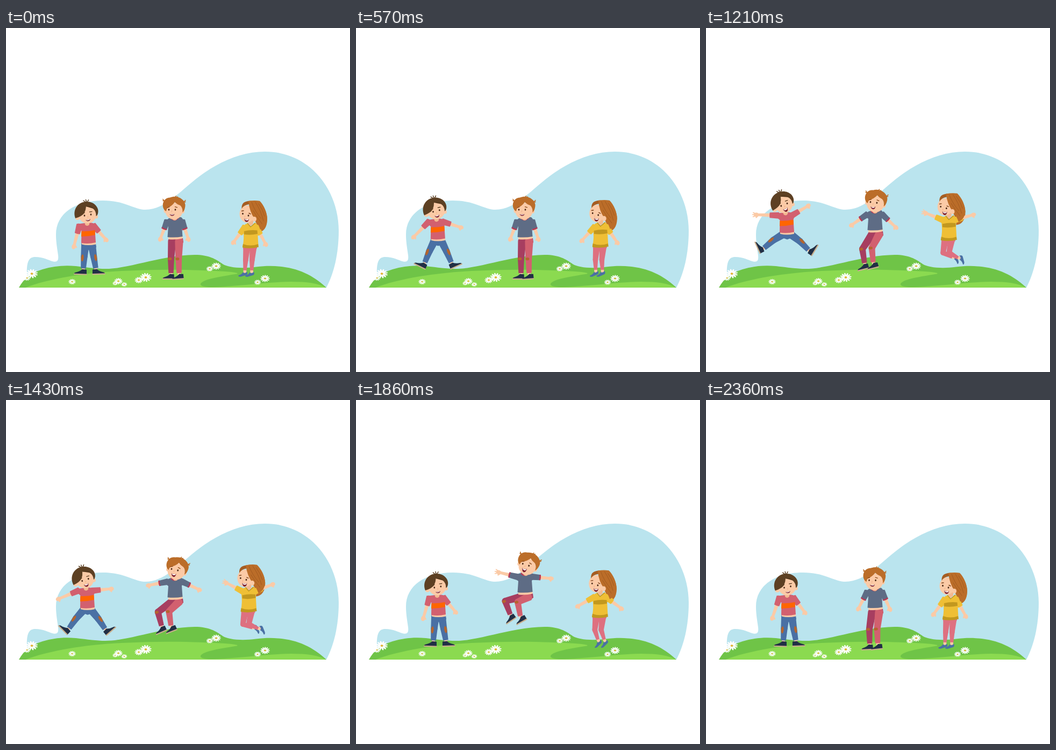
An HTML page for the animation above (2430 ms loop, 640 px wide and 640 px high).

```html
<!DOCTYPE html>
<html lang="en">
<head>
<meta charset="utf-8">
<title>Jumping kids</title>
<style>
  html, body { margin: 0; width: 100%; height: 100%; overflow: hidden; background: #fff; }
  svg { display: block; width: 100%; height: 100%; }
</style>
</head>
<body>
<svg id="stage" viewBox="0 0 640 640">
  <path fill="#bae4ee" d="M39 460C38 436 42 426 54 426C70 426 78 432 88 434.5C96 436 98 432 97 423C95 408 93 398 93 384C93 346 128 321 180 321C222 321 238 338 259 338C299 338 325 300 368 270C403 246 441 230 482 230C565 230 619 301 619 377C619 420 610 457 596 483H60Z"/>
  <path fill="#6fc447" d="M24 483C33 466 48 455 68 449C88 443 108 441 130 443C165 447 185 451 215 445C256 438 303 422.500 351 422C378 422 390 430 403 439C413 446 440 448 465 444.500C520 438 562 451 596 483Z"/>
  <path fill="#8bda50" d="M36 483C80 466 150 455 215 452C290 448 370 450 420 454C433 456 433 457 426 458C390 464 366 468 362 476C361 480 368 482 385 482C430 481 480 473 530 472C560 472 582 475 595 483Z"/>
  <g id="flowers"></g>
  <g id="kids"></g>
</svg>
<script>
const LOOP = 2430, STEPS = 34;
const SKIN = '#fbcaa6', SHADE = '#f3b991', NAVY = '#212f45', SOLE = '#c9ae8c', JEANS = '#4a70a4';
const RED = '#d2606f', MAROON = '#a73e60', GREY = '#5e6c85', YELLOW = '#efbf35', OCHRE = '#c2981f';
const PINK = '#de7080', GINGER = '#bb6d29', BROWN = '#5d4023', PATCH = '#b5652d';

const path = (d, fill) => `<path d="${d}" fill="${fill}"/>`;
const line = (d, color, w) =>
  `<path d="${d}" fill="none" stroke="${color}" stroke-width="${w}" stroke-linecap="round"/>`;
const oval = (x, y, rx, ry, fill) => `<ellipse cx="${x}" cy="${y}" rx="${rx}" ry="${ry}" fill="${fill}"/>`;
const joint = (name, inner) => `<g data-j="${name}">${inner}</g>`;

function daisy(x, y, r) {
  let petals = '';
  for (let a = 0; a < 360; a += 30) {
    petals += `<ellipse cx="${r * .6}" rx="${r * .4}" ry="${r * .14}" fill="#fff" transform="rotate(${a + x % 30})"/>`;
  }
  return `<g transform="translate(${x} ${y}) scale(1 .76)">${petals}${oval(0, 0, r * .2, r * .2, '#f0b32e')}</g>`;
}

// Each patch is one big daisy with smaller ones beside it
const meadow = [
  daisy(39, 465, 7), daisy(48, 457, 11.5), daisy(123, 472, 7),
  daisy(203, 475, 5), daisy(209, 471, 8), daisy(220, 477, 5.5),
  daisy(247, 469, 8), daisy(260, 464, 11), daisy(379, 448, 6.5),
  daisy(391, 443, 9), daisy(468, 473, 6.5), daisy(482, 466, 9)
];
document.getElementById('flowers').innerHTML = meadow.join('');

// Limb pieces hang downwards from their joint
const taper = (len, a, b, fill, round) =>
  path(`M${-a} 0L${-b} ${len}${round ? `A${b} ${b} 0 0 0 ${b} ${len}` : `H${b}`}L${a} 0A${a} ${a} 0 0 0 ${-a} 0Z`, fill);

function arm(side, k) {
  const [, , len] = k.arms[side], dir = side ? -1 : 1;
  const fingers = line('M-2 1L-4 6M0 2V7M2 1L4 6', SKIN, 1.8);
  return joint('arm' + side,
    taper(len - 4, 3.8, 2.5, SKIN) + oval(0, len - 1, 3.9, 5, SKIN) +
    line(`M${dir * 2} ${len - 4}L${dir * 5} ${len - 1}`, SKIN, 2.4) +
    `<g transform="translate(0 ${len - 1})">${joint('fingers' + side, fingers)}</g>` +
    path('M-6 -2Q0 -6 6 -2L5 15Q0 16 -5 15Z', k.sleeve) +
    (k.trim ? path('M-5.2 13Q0 14 5.2 13L5 15.6Q0 16.6 -5 15.6Z', k.trim) : ''));
}

function leg(side, k) {
  const [hip, knee, ankle] = k.legWidth, color = k.pants[side];
  const foot = joint('foot' + side, path('M-2.8 -1H2.8V5H-2.8Z', SKIN) + k.shoe(side));
  return joint('thigh' + side, joint('upper' + side, taper(k.thigh, hip, knee, color, true)) +
    joint('shin' + side, foot + taper(k.shin, knee, ankle, color) + k.patch(side)));
}

const sneaker = (dx, sx) => `<g transform="translate(${dx} 0) scale(${sx} 1)">` +
  path('M6 2.5L-2 1.5Q-7 6 -15 7.5Q-18 9 -17 10.5L6 11Z', NAVY) + line('M-17 10.4L5.5 11.2', SOLE, 2.2) + '</g>';

const mouth = (x, y, tilt) => `<g transform="translate(${x} ${y}) rotate(${tilt})">` + joint('mouth',
  path('M-4.5 -1.5Q0 .5 4.5 -2Q4 5 .3 5Q-3 5 -4.5 -1.5Z', '#7d2230') +
  path('M-4 -1.2Q0 .5 4 -1.6Q3.6 1.6 0 1.6Q-3 1.4 -4 -1.2Z', '#fff')) + '</g>';

const eye = (x, y) => oval(x, y, 1.4, 1.7, '#4a2a18');
const nose = (x, y) => line(`M${x} ${y}l-.4 2`, '#e8a77f', .9);

// Every kid moves between a resting and a jumping pose.
// Angles in degrees; legs are [thigh, shin, foot], left then right.
const kids = [
  {
    rise: [130, 1210], fall: [1210, 1830], sway: 12,
    rest: { x: 0, y: 0, head: 0, arms: [15, -42], legs: [[5, 4, 0], [-9, -10, 0]], short: 1, smile: .25 },
    jump: { x: -3, y: -19.5, head: -13, arms: [92, -121], legs: [[59, 50, 64], [-53, -45, -57]], short: 1, smile: 1 },
    arms: [[136.5, 368, 41], [163, 368, 36]], sleeve: RED,
    hips: [[147.5, 402.5], [159.5, 402.5]], thigh: 22.5, shin: 22.5,
    pants: [JEANS, JEANS], legWidth: [7.4, 6.2, 4.8],
    patch: side => oval(side ? 3.2 : -3.2, 3, 2.5, 6.5, PATCH),
    shoe: side => sneaker(0, side ? -1 : 1),
    neck: [150.5, 364], back: '',
    pelvis: path('M141 401H167L168 408L154 413L140 408Z', JEANS),
    torso: path('M141 398H167V402.5Q153 405.5 141 402.5Z', SKIN) +
      path('M138 364L146 363Q151 368 156 362L162 363Q166 366 167 372L165.5 376L167 399Q153 402.5 140 400L140.5 377L135 372Q135 366 138 364Z', RED) +
      path('M140.5 378Q152 379 165.5 376L166 385Q153 388 140 388Z', '#ff6500'),
    head: path('M147 358H155V366Q151 370 147 366Z', SHADE) +
      oval(133, 353.5, 4, 3.8, SKIN) + oval(168, 351, 3.2, 3.6, SKIN) + oval(151.5, 347, 16.5, 16.5, SKIN) +
      path('M129 354C123 337 135 323 150 323C165 323 174 335 171 345Q170 349 167.5 350Q168 341 162 336Q155 334 149 332Q148 346 139 350L135 352Z', BROWN) +
      line('M149 325L144 321M150 325L148.5 319.5M150.5 325L153.5 319.8', BROWN, 1.5) +
      line('M150 332Q158 331 163 336', '#4a3019', .8) +
      eye(146, 349) + eye(158, 347) + line('M155.5 342.2L160 341.6M143.5 345L146 343.6', BROWN, 1.4) +
      nose(152.5, 350.5) + mouth(152.5, 357, -9)
  },
  {
    rise: [800, 1800], fall: [1800, LOOP], sway: 0,
    rest: { x: 0, y: 0, head: 0, arms: [21, -19], legs: [[3.5, 0, -2], [1.5, -2, -6]], short: 1, smile: .3 },
    jump: { x: 0, y: -33, head: 19, arms: [109, -89], legs: [[80, -22, -38], [69, -11, -33]], short: .7, smile: 1.2 },
    arms: [[299.5, 360, 36], [328, 360, 36]], sleeve: GREY, trim: '#b93a57',
    hips: [[309, 397], [322, 397]], thigh: 32.5, shin: 26.5,
    pants: [MAROON, RED], legWidth: [7.6, 6, 4.6],
    patch: () => oval(-2.2, 0, 3.6, 2.6, PATCH),
    shoe: side => sneaker(side * 2, .92),
    neck: [314, 360], back: '',
    pelvis: path('M303 391H329L330 399L320 404L302 402Z', MAROON),
    torso: path('M302 386H328.5V391.5Q315 394.5 302 393Z', SKIN) +
      path('M303 354L308 353Q314 360 320 352L326 352Q331 356 331 364L327 367L328.5 388Q315 390.5 300.5 389L302 368L297 364Q298 357 303 354Z', GREY) +
      line('M307.5 353.5Q314 361 320.5 352.5', '#c03c57', 2.4),
    head: path('M309 350H318V356Q314 360 309.5 356Z', SHADE) +
      oval(296.5, 340, 3, 4, SKIN) + oval(329, 341, 3, 4, SKIN) + oval(312.5, 340.5, 16, 15.5, SKIN) +
      path('M298 341C288 336 290 316 305 315.5C320 309 337 321 333 334Q332 340 328.5 343Q329 334 324 330Q318 328 314 324Q308 332 301 334Q298 337 298 341Z', GINGER) +
      line('M294 322L292 318.5M294 320.5L292 321.5M331 323.5L334 320.5M332 324L334 323.5M314 316L316.5 312.5M316 316L319.5 314', GINGER, 1.5) +
      eye(303, 338) + eye(315, 338) + line('M300.5 334.2L304 333M314.5 332.6L318.5 333.8', '#8a4a1a', 1.3) +
      nose(308.5, 340) + mouth(309, 347, -3)
  },
  {
    rise: [480, 1330], fall: [1400, 2080], sway: 0,
    rest: { x: 0, y: 0, head: 0, arms: [37, -29], legs: [[5, 4, 0], [5, 2, 0]], short: 1, smile: .8 },
    jump: { x: -3.5, y: -15, head: -2, arms: [120, -114], legs: [[9, -71, -98], [11, -66, -98]], short: 1, smile: 1 },
    arms: [[444, 371, 36], [466, 371, 37]], sleeve: YELLOW,
    hips: [[448, 407], [460, 407]], thigh: 25, shin: 19,
    pants: [PINK, PINK], legWidth: [6.6, 4.8, 3],
    patch: () => '',
    shoe: () => path('M4 2.5Q6 8 2 9L-8 12Q-13 12 -12 9.5Q-6 8 -3.5 3.5Q0 7 4 2.5Z', JEANS),
    neck: [456, 366],
    back: path('M452 322H471C480 330 486 344 486 356C486 371 479 380 468 380.5C470 370 464 356 454 345Z', GINGER),
    pelvis: path('M442 404H467V410L454 415L441 411Z', PINK),
    torso: path('M445 365L450 363L456 370L463 362L467 365Q471 371 468 378L469.5 405Q455 411 440 407Q444 392 441 373Z', YELLOW) +
      path('M443 378Q455 375 467.5 376.5L468 383Q455 386 443 384Z', OCHRE) +
      path('M441 402Q455 407 469 402L470 407.5Q455 411.5 440 408.5Z', OCHRE) +
      line('M449.5 363.5L455 370L463.5 363', OCHRE, 1.6),
    head: path('M451 357H460V364L455 368L451 364Z', SHADE) +
      oval(448.5, 346, 14, 16, SKIN) +
      path('M438.5 336C438 325 444 322 456 321.5L452 328Q443 329 438.5 336Z', '#a65d22') +
      path('M451 322Q462 320 472 321.8C480 330 486 344 486 356Q485 369 473 375Q469 363 462 354Q453 342 451 322Z', GINGER) +
      line('M457 324Q463 341 474 354M464 324Q474 339 479 359M460 340Q467 352 476 364M470 327Q478 338 481 350', '#9c571f', .8) +
      oval(462, 355.5, 4, 4.6, SKIN) +
      eye(440.5, 345.5) + eye(451, 349) + line('M438.5 340.5L442 340M452 344.5L455 346', '#7b421a', 1.4) +
      nose(444.5, 350) + mouth(447.5, 356.5, 8)
  }
];

const root = document.getElementById('kids');
for (const k of kids) {
  k.el = document.createElementNS('http://www.w3.org/2000/svg', 'g');
  k.el.innerHTML = joint('head', k.back) + k.pelvis + leg(0, k) + leg(1, k) +
    arm(0, k) + arm(1, k) + k.torso + joint('head', k.head);
  root.append(k.el);
  k.parts = [...k.el.querySelectorAll('[data-j]')];
}

const clamp = u => Math.min(1, Math.max(0, u));

// Halfway between a straight ramp and a smoothstep
function ramp(t, [from, to]) {
  const u = clamp((t - from) / (to - from));
  return (u + u * u * (3 - 2 * u)) / 2;
}

function mix(a, b, p) {
  if (typeof a === 'number') return a + (b - a) * p;
  if (Array.isArray(a)) return a.map((v, i) => mix(v, b[i], p));
  return Object.fromEntries(Object.keys(a).map(key => [key, mix(a[key], b[key], p)]));
}

const place = (x, y, angle) => `translate(${x} ${y}) rotate(${angle})`;

function pose(k, t) {
  const now = mix(k.rest, k.jump, ramp(t, k.rise) - ramp(t, k.fall));
  // Arms and head swing once more after landing
  const landed = k.fall[1];
  const swing = t > landed ? k.sway * Math.sin(Math.PI * (t - landed) / (LOOP - landed)) : 0;

  const moves = {
    head: `rotate(${now.head - swing * .4} ${k.neck})`,
    mouth: `scale(1 ${.3 + .7 * now.smile})`
  };
  for (const side of [0, 1]) {
    const [thigh, shin, foot] = now.legs[side];
    const short = side ? now.short : 1;
    const [ax, ay] = k.arms[side], angle = now.arms[side] + swing;
    moves['arm' + side] = place(ax, ay, angle);
    moves['fingers' + side] = `scale(${side ? 0 : clamp((angle - 80) / 12)})`;
    moves['thigh' + side] = place(...k.hips[side], thigh);
    moves['upper' + side] = `scale(1 ${short})`;
    moves['shin' + side] = place(0, k.thigh * short, shin - thigh);
    moves['foot' + side] = place(0, k.shin, foot - shin);
  }
  k.el.setAttribute('transform', `translate(${now.x} ${now.y})`);
  for (const p of k.parts) p.setAttribute('transform', moves[p.dataset.j]);
}

const start = performance.now();
function draw(now) {
  const t = Math.max(0, now - start) % LOOP, step = LOOP / STEPS;
  const held = Math.min(STEPS - 1, Math.floor((t + 5.5) / step)) * step;
  for (const k of kids) pose(k, held);
  requestAnimationFrame(draw);
}
draw(start);
</script>
</body>
</html>
```
